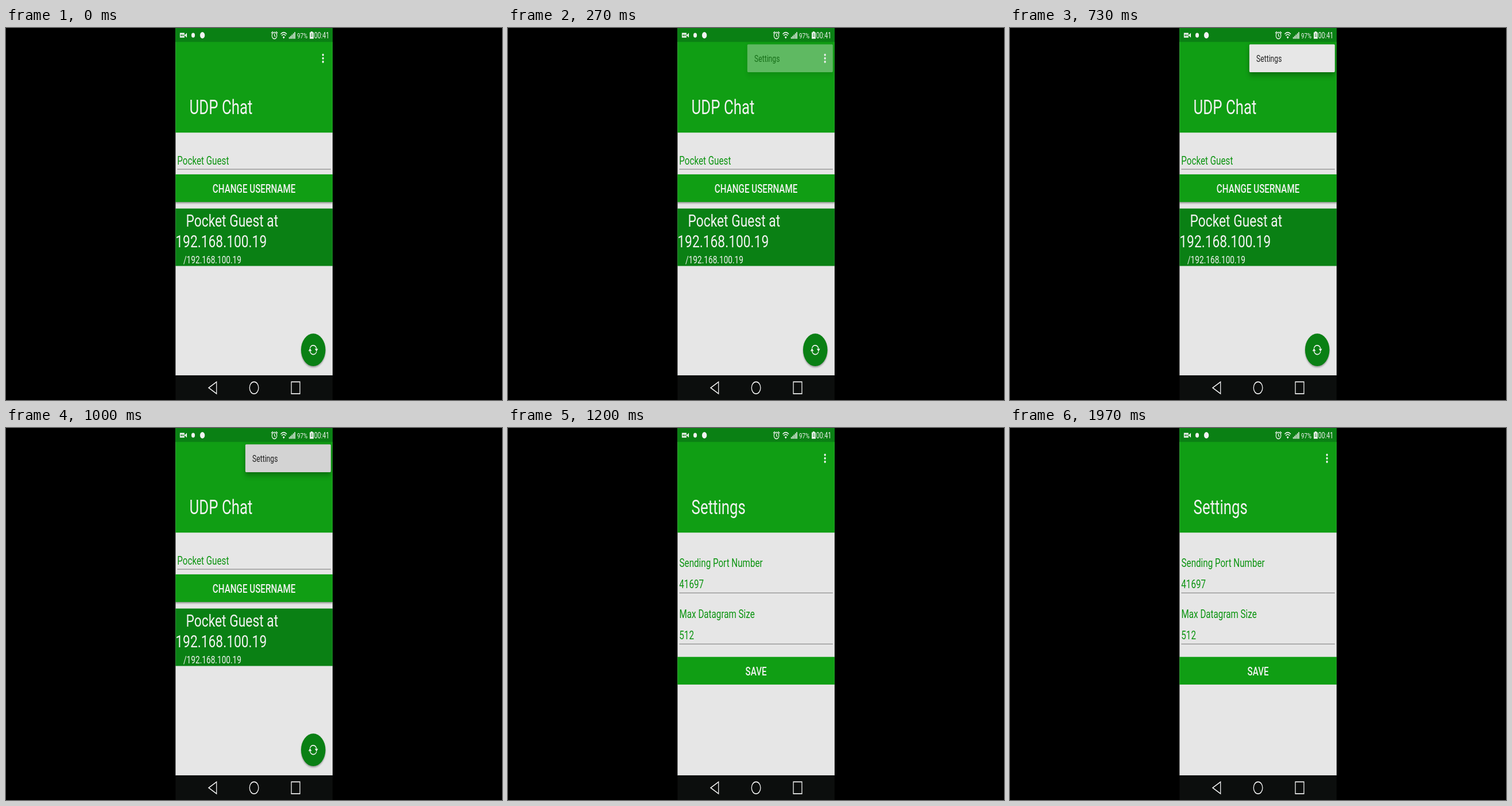
An HTML page for the animation above (2 s loop, 864 by 648 pixels).

```html
<!DOCTYPE html>
<html lang="en">
<head>
<meta charset="utf-8">
<title>UDP Chat</title>
<style>
html, body { margin: 0; height: 100%; overflow: hidden; background: #000; }
svg { display: block; width: 100vw; height: 100vh; font: 20px Roboto, sans-serif; }
.paper { fill: #e6e6e6; }
.green { fill: #109e14; }
.dark { fill: #0a8014; }
.ink { fill: #0b9410; }
.white { fill: #f2f2f2; }
.outline { fill: none; stroke: #f2f2f2; stroke-width: 1.7; }
.rule { stroke: #777; stroke-width: 1; }
.title { font-size: 34px; }
.button { font-weight: 500; text-anchor: middle; }
.raised { filter: drop-shadow(0 2px 1.5px rgba(0, 0, 0, .35)); }
#menu { filter: drop-shadow(0 4px 5px rgba(0, 0, 0, .35)); }
</style>
</head>
<body>
<svg viewBox="0 0 864 648" preserveAspectRatio="none">
<rect width="864" height="648"/>
<!-- a 360 x 640 dp phone, squeezed sideways -->
<g transform="translate(295.3) scale(.76 1.0125)">
  <rect class="paper" width="360" height="598"/>
  <rect class="green" width="360" height="180"/>

  <g id="chat">
    <text class="white title" x="32" y="148">UDP Chat</text>
    <text class="ink" x="4" y="235.5">Pocket Guest</text>
    <path class="rule" d="M4 243H356"/>
    <rect class="green raised" y="251.8" width="360" height="47.6"/>
    <text class="white button" x="180" y="283.7">CHANGE USERNAME</text>
    <rect class="dark" y="310.6" width="360" height="98.8"/>
    <g class="white" font-size="30">
      <text x="24" y="342.2">Pocket Guest at</text>
      <text x="0" y="377.3">192.168.100.19</text>
      <text x="18" y="405" font-size="18">/192.168.100.19</text>
    </g>
    <circle class="dark raised" cx="315.7" cy="553.8" r="28"/>
    <g transform="translate(315.7 553.8)">
      <g id="arrow">
        <path class="outline" stroke-width="2" d="M-7.5 -3A8 8 0 0 1 7.5 -2"/>
        <path class="white" d="M3.5 -2H11L7.5 3Z"/>
      </g>
      <use href="#arrow" transform="rotate(180)"/>
    </g>
  </g>

  <g id="settings">
    <text class="white title" x="32" y="148">Settings</text>
    <g class="ink">
      <text x="4.3" y="239">Sending Port Number</text>
      <text x="4" y="275.5">41697</text>
      <text x="4.3" y="327">Max Datagram Size</text>
      <text x="4" y="363.6">512</text>
    </g>
    <path class="rule" d="M4 283.6H356M4 371.5H356"/>
    <rect class="green" y="393.8" width="360" height="47.6"/>
    <text class="white button" x="180" y="425.6">SAVE</text>
  </g>

  <g class="white">
    <circle cx="338" cy="46.2" r="2.1"/>
    <circle cx="338" cy="52.2" r="2.1"/>
    <circle cx="338" cy="58.2" r="2.1"/>
  </g>

  <g id="menu">
    <rect id="sheet" x="160" y="28.2" width="196" height="47.8" rx="2"/>
    <text x="176" y="58.7" font-size="16" fill="#222">Settings</text>
  </g>

  <rect class="dark" width="360" height="24"/>
  <g class="white">
    <path d="M10 8.5H20.5V16.5H10ZM20.5 12.5L26 8.5V16.5Z"/>
    <path d="M12 11H14V14H12ZM15 11H16.5V14H15ZM17.5 11H19V14H17.5Z" class="dark"/>
    <circle cx="40.4" cy="12.5" r="4"/>
    <circle cx="61.6" cy="12.5" r="5.5"/>
    <text x="278.5" y="17.4" font-size="13">97%</text>
    <path d="M307.6 7.5H310V6H314V7.5H316.6V18.6H307.6Z"/>
    <path class="dark" d="M310 10H314.5V11.2H310ZM310 13H314.5V14.2H310Z"/>
    <text x="352.5" y="17.7" font-size="14" text-anchor="end">00:41</text>
    <path d="M245.5 15.5A4 4 0 0 1 250.5 15.5L248 18.5Z"/>
  </g>
  <g class="outline" style="stroke-width:1.5">
    <circle cx="226.7" cy="13" r="5.6"/>
    <path d="M226.7 9.5V13.3L229 15M219.5 9L223 6M234 9L230.5 6"/>
    <path d="M241 10.5Q248 4.5 255 10.5M243.3 13.2Q248 9 252.7 13.2"/>
    <path style="stroke-width:2" d="M261 18.5V15.5M264.1 18.5V13.5M267.2 18.5V11.3M270.3 18.5V9.2M273.4 18.5V7"/>
  </g>

  <rect y="597.6" width="360" height="42.4" fill="#0c0e0d"/>
  <g class="outline">
    <path d="M76 619L94 608.8V629.2Z"/>
    <circle cx="180" cy="619" r="10.3"/>
    <rect x="265.5" y="608.8" width="19.6" height="20.4"/>
  </g>
</g>
</svg>
<script>
const LOOP = 2000, FPS = 30, SWITCH = 1033;
const $ = id => document.getElementById(id);
const ramp = (t, from, to) => Math.min(1, Math.max(0, (t - from) / (to - from)));
const show = (id, on) => $(id).setAttribute('display', on ? 'inline' : 'none');

function draw(now) {
  const t = Math.floor(now % LOOP * FPS / 1000) * 1000 / FPS;
  const inSettings = t >= SWITCH;
  show('chat', !inSettings);
  show('settings', inSettings);

  const alpha = ramp(t, 230, 330) * (1 - ramp(t, SWITCH, SWITCH + 110));
  show('menu', alpha > 0);
  $('menu').style.opacity = alpha;
  const shade = Math.round(231 - 20 * ramp(t, 920, 990));
  $('sheet').setAttribute('fill', `rgb(${shade},${shade},${shade})`);
}

let start;
function tick(now) {
  start ??= now;
  draw(now - start);
  requestAnimationFrame(tick);
}
draw(0);
requestAnimationFrame(tick);
</script>
</body>
</html>
```
